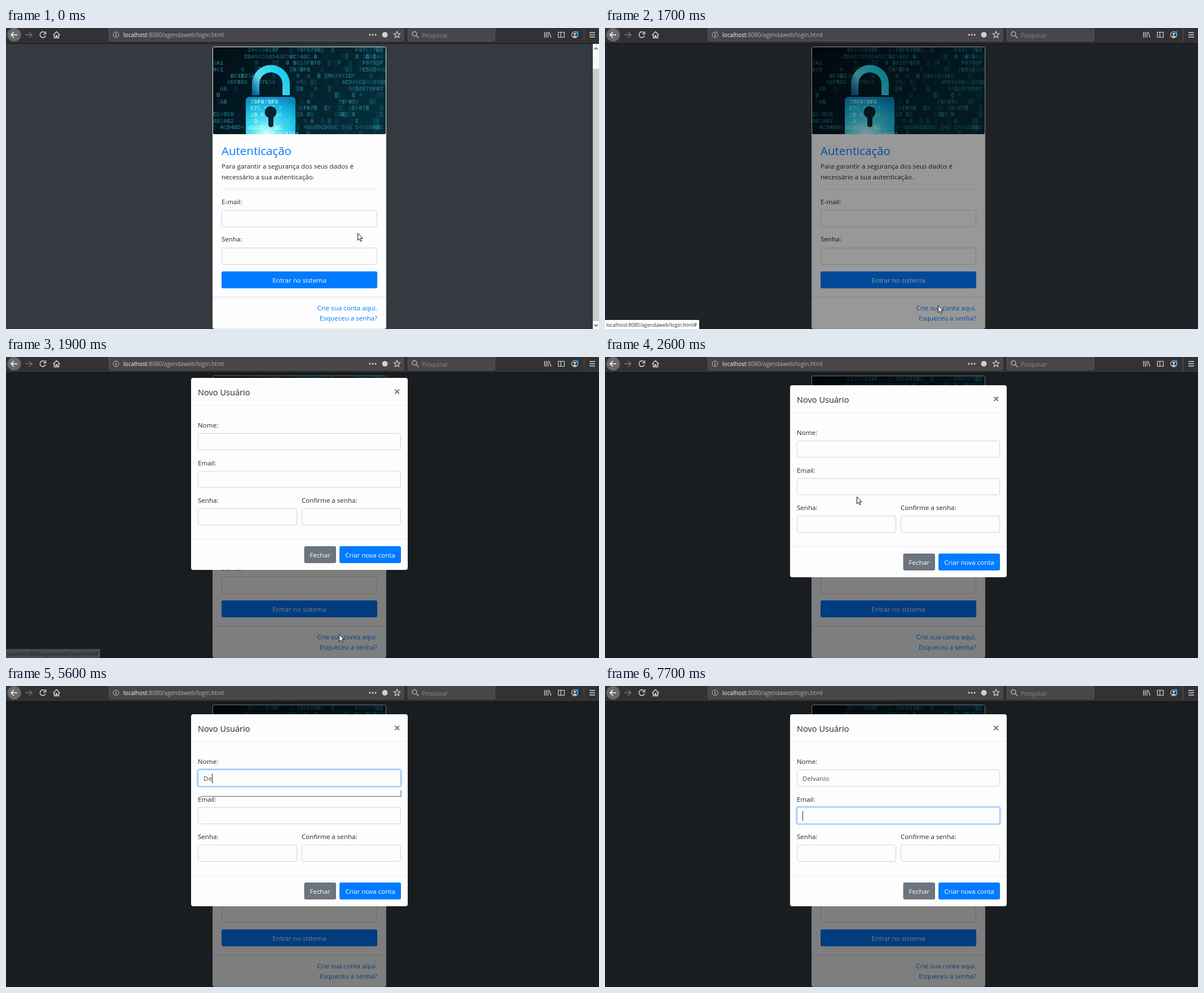
Recreate the animation shown at these times as an HTML page. Size 1051x533 px, loop 8000 ms.

```html
<!DOCTYPE html>
<html lang="pt">
<head>
<meta charset="utf-8">
<style>
html, body { margin: 0; width: 100%; height: 100%; overflow: hidden; background: #343a40; }
svg { display: block; font-family: "Open Sans", "Noto Sans", sans-serif; }
text { white-space: pre; }
.code { font: bold 10.3px "Liberation Mono", monospace; }
.icon { fill: none; stroke: #d8d8da; stroke-width: 1.5; }
</style>
</head>
<body>
<svg id="stage" width="1051" height="533" viewBox="0 0 1051 533"></svg>
<script>
const BLUE = "#007bff", INK = "#212529", BODY = 11.6;
const USER = "Delvanio";

const box = (x, y, w, h, fill, more = "") =>
  `<rect x="${x}" y="${y}" width="${w}" height="${h}" fill="${fill}" ${more}/>`;
const label = (x, y, str, size = BODY, fill = INK, more = "") =>
  `<text x="${x}" y="${y}" font-size="${size}" fill="${fill}" ${more}>${str}</text>`;
const rule = (x, y, w, color) => box(x, y, w, 1, color);
const icon = (d, more = "") => `<path class="icon" d="${d}" ${more}/>`;
const field = (x, y, w, id = "") =>
  (id && box(x - 1, y - 1, w + 2, 31.5, "none", `id="${id}Ring" rx="4" stroke="${BLUE}" stroke-opacity=".25" stroke-width="2.6"`)) +
  box(x + .5, y + .5, w - 1, 29, "#fdfdfd", `id="${id}Field" rx="3" stroke="#ced4da"`);
const button = (x, y, w, str, fill) =>
  box(x, y, w, 30, fill, 'rx="3"') + label(x + w / 2, y + 19.5, str, BODY, "#fff", 'text-anchor="middle"');

let seed = 7;
const random = () => (seed = seed * 16807 % 2147483647) / 2147483647;

// Rows of digits in a fixed grid, each with its own brightness
const digits = (x, y, rows, color, low, high) => rows.map((row, r) =>
  [...row].map((c, i) => c === " " ? "" :
    `<text class="code" x="${(x + i * 6.15).toFixed(1)}" y="${(y + r * 11.4).toFixed(1)}" fill="${color}" opacity="${(low + random() * (high - low)).toFixed(2)}">${c}</text>`
  ).join("")).join("");

// Faint glowing cells, denser to the right
const cells = Array.from({ length: 130 }, () => {
  const u = Math.sqrt(random());
  return box((367 + Math.floor(u * 50) * 6.15).toFixed(1), (34 + Math.floor(random() * 14) * 11.4).toFixed(1), 6.2, 10,
    "#15697c", `opacity="${(random() * .45).toFixed(2)}"`);
}).join("");

const codeRows = [
  "          29018018F     78F0780          F07EF7E8",
  "         CD45CD56D45C3BC34BC B           B 3AB34B",
  "9A1         9        0 9018F078     F      F078 F",
  "901     9              078F6              7E56D45C",
  "     BC4B23A            B  A  A  9A1891EF",
  "    6EF6DE  F67E56      05           4CD45CD4CD4BD",
  "  AB  2                  8   0         9018F78F07",
  " D                                      C 4",
  "  AB                       0        78F078",
  "                         EF67F  E7      EF67F",
  "CD45CD                   3 D       23B  B",
  "AB2AB2                    8 0            E",
  "  4CD4BD4                 4BD45CD4BC  4  D45CD4BC"
];
const lockRows = [" 78F078F0", " E7E 67E 7", " 2B B   34", "  3", "4C4BC   BC", "       A129A29A"];

const banner = `<g clip-path="url(#bannerClip)">
  ${box(367, 34, 306, 154, "url(#night)")}
  ${cells}
  ${digits(367, 42.3, codeRows, "#2b8ca5", .3, .85)}
  <path d="M442.500 119V99a27 27 0 0 1 54 0V119" fill="none" stroke="url(#steel)" stroke-width="13"/>
  ${box(425, 122, 88, 75, "url(#lock)", 'rx="6"')}
  ${digits(427, 134, lockRows, "#d6fdff", .3, .9)}
  <path d="M465 153h9v18a4.500 4.500 0 0 1-9 0z" fill="#032733"/>
  <circle cx="469" cy="149" r="10.500" fill="#032733"/></g>`;

const page = `${box(0, 28, 1051, 505, "#343a40")}
  ${box(366.5, 33.5, 307, 499, "#fdfdfd", 'rx="3" stroke="#e2e3e3"')}
  ${banner}
  ${label(382, 225, "Autenticação", 20.5, BLUE)}
  ${label(382, 249, "Para garantir a segurança dos seus dados é")}
  ${label(382, 268, "necessário a sua autenticação.")}
  ${rule(382, 285, 276, "#e3e3e3")}
  ${label(382, 312, "E-mail:")}${field(382, 322.5, 276)}
  ${label(382, 378, "Senha:")}${field(382, 389, 276)}
  ${button(382, 431, 276, "Entrar no sistema", BLUE)}
  ${rule(366, 476, 308, "#dcdcdc")}
  ${label(658, 500, "Crie sua conta aqui.", BODY, BLUE, 'id="signup" text-anchor="end"')}
  ${label(658, 518, "Esqueceu a senha?", BODY, BLUE, 'text-anchor="end"')}`;

const scrollbar = `<g id="scrollbar">${box(1040, 28, 11, 505, "#fafafa")}${box(1040, 72, 11, 447, "#cdcdcd")}
  <path d="M1043 38l3-3 3 3M1043 525l3 3 3-3" fill="none" stroke="#505050" stroke-width="1.500"/></g>`;

const status = `<g id="status">${box(0, 517, 167, 16, "#fff")}
  ${label(2, 529, "localhost:8080/agendaweb/login.html#", 8.85, "#333")}</g>`;

const modal = `<g id="modal">
  ${box(328, 50, 384, 340, "#fdfdfd", 'rx="4"')}
  ${label(340, 81, "Novo Usuário", 14.6)}
  <path d="M689.500 70.500l7.500 7.500m0-7.500l-7.500 7.500" stroke="#777" stroke-width="2"/>
  ${rule(328, 98, 384, "#e9ecef")}
  ${label(340, 138, "Nome:")}${field(340, 148, 360, "name")}
  ${label(350, 168, "", BODY, "#495057", 'id="typed"')}
  ${label(340, 205, "Email:")}${field(340, 214.5, 360, "mail")}
  ${label(340, 271, "Senha:")}${field(340, 281, 176)}
  ${label(524, 271, "Confirme a senha:")}${field(524, 281, 176)}
  ${rule(328, 335, 384, "#e9ecef")}
  ${button(528.5, 348, 56.5, "Fechar", "#6c757d")}
  ${button(591, 348, 109, "Criar nova conta", BLUE)}
  <path id="popup" d="M345 195.500H700V184" fill="none" stroke="#8c8c8c" stroke-width="1.500"/>
  ${box(350, 155, 1, 17, "#222", 'id="caret"')}</g>`;

const star = Array.from({ length: 10 }, (_, i) => {
  const a = i * Math.PI / 5, r = i % 2 ? 2.7 : 6;
  return `${(693 + r * Math.sin(a)).toFixed(1)} ${(12 - r * Math.cos(a)).toFixed(1)}`;
}).join("L");

const toolbar = `${box(0, 0, 1051, 28, "#323234")}${rule(0, 27, 1051, "#0f0f10")}
  ${box(182.5, -3, 522, 26, "#474749", 'rx="2" stroke="#59595b"')}
  ${box(712.5, -3, 154, 26, "#474749", 'rx="2" stroke="#59595b"')}
  <circle cx="14.500" cy="12" r="12" fill="#69696b"/>
  ${icon("M20 12H9M14 7l-5 5 5 5", 'style="stroke:#fff"')}
  ${icon("M34 12h11M41 7l5 5-5 5", 'opacity=".4"')}
  ${icon("M69 8.500a5 5 0 1 0 1 5M70.500 6v4.500H66")}
  ${icon("M83.500 12.500L89.500 6.500l6 6M85.500 12v5.500h3v-4h2v4h3V12")}
  <g opacity=".8"><circle class="icon" cx="195" cy="12" r="5" style="stroke-width:1"/>${icon("M195 11v4M195 8.500v1.200")}</g>
  ${label(208, 16, 'localhost<tspan fill="#b1b1b3">:8080/agendaweb/login.html</tspan>', 10.15, "#f9f9fa")}
  ${[645, 650, 655].map(x => `<circle cx="${x}" cy="12" r="1.500" fill="#d8d8da"/>`).join("")}
  <circle cx="671.500" cy="12" r="5" fill="#d0d0d2"/>
  ${icon(`M${star}Z`, 'style="stroke-width:1.2"')}
  <g opacity=".75"><circle class="icon" cx="724" cy="10.500" r="4"/>${icon("M727 13.500l4.500 4.500")}</g>
  ${label(737, 16.5, "Pesquisar", 10.15, "#88888a")}
  ${icon("M954.500 7v10M957.500 7v10M960.500 7v10M962.500 7l3.500 10", 'style="stroke-width:1.2"')}
  ${icon("M979 7.500h10.500v9H979zM983.500 7.500v9", 'style="stroke-width:1.2"')}
  <circle class="icon" cx="1008" cy="12" r="5.500" style="stroke-width:1.200"/>
  <circle cx="1008" cy="10.500" r="2" fill="#d8d8da"/><path d="M1004.500 15a4 3 0 0 1 7 0l-3.500 2z" fill="#d8d8da"/>
  <circle cx="1012" cy="8" r="2.500" fill="#0a9bff"/>
  ${box(1024, 0, 1, 24, "#555")}
  ${icon("M1034 8h10M1034 12h10M1034 16h10")}`;

document.getElementById("stage").innerHTML = `<defs>
  <clipPath id="bannerClip">${box(367, 34, 306, 154, "#000", 'rx="2"')}</clipPath>
  <linearGradient id="night" y2=".4"><stop stop-color="#020d14"/><stop offset=".5" stop-color="#031e28"/><stop offset="1" stop-color="#052c38"/></linearGradient>
  <linearGradient id="steel" x1="0" y1="1" x2="1" y2=".3"><stop stop-color="#0b62a0"/><stop offset=".4" stop-color="#5bdcf0"/><stop offset="1" stop-color="#16d0ec"/></linearGradient>
  <radialGradient id="lock" cx=".42" cy=".88" r=".95"><stop stop-color="#d8ffff"/><stop offset=".35" stop-color="#4fe0f2"/><stop offset=".7" stop-color="#17b9e0"/><stop offset="1" stop-color="#0b85bd"/></radialGradient></defs>
  ${page}${scrollbar}${box(0, 28, 1051, 505, "#000", 'id="backdrop"')}${status}${modal}${toolbar}
  <path id="cursor" d="M.5.500V13l2.800-2.700 2 4.500 2-.9-2-4.400h3.700z" fill="#fff" stroke="#111"/>`;

const $ = id => document.getElementById(id);
const show = (id, on) => $(id).style.display = on ? "" : "none";
const ramp = (t, start, length) => Math.min(1, Math.max(0, (t - start) / length));
const latest = (keys, t) => keys.filter(k => k[0] <= t).pop();

const pointer = [
  [0, 623, 363], [300, 609, 425], [400, 590, 485], [600, 590, 488], [700, 590, 491],
  [2300, 640, 430], [2400, 661, 365], [2600, 446, 247], [2700, 460, 217],
  [2800, 474, 188], [3000, 476, 188], [3300, 482, 179], [3400, 490, 170]
];
const typing = [[0, 0], [5300, 1], [5600, 2], [5800, 3], [6000, 4], [6200, 5], [6300, 7], [6400, 8]];

function focus(id, amount) {
  $(id + "Ring").style.opacity = amount;
  $(id + "Field").setAttribute("stroke", amount > .5 ? "#80bdff" : "#ced4da");
}

function draw(t) {
  const [, x, y] = latest(pointer, t);
  $("cursor").setAttribute("transform", `translate(${x} ${y})`);
  show("cursor", t < 3500);

  const hover = t >= 600 && t < 1700;
  $("signup").setAttribute("fill", hover ? "#0056b3" : BLUE);
  $("signup").setAttribute("text-decoration", hover ? "underline" : "none");
  $("status").style.opacity = ramp(t, 600, 300) - ramp(t, 1740, 200);

  show("scrollbar", t < 1700);
  $("backdrop").style.opacity = .5 * ramp(t, 1600, 125);
  $("modal").style.opacity = ramp(t, 1730, 150);
  const slide = -50 * (1 - ramp(t, 1730, 300)) ** 1.6;
  $("modal").setAttribute("transform", `translate(0 ${Math.round(slide)})`);

  const onMail = t >= 7600;
  focus("name", ramp(t, 4250, 150) - ramp(t, 7550, 150));
  focus("mail", ramp(t, 7550, 150));
  $("typed").textContent = USER.slice(0, latest(typing, t)[1]);
  show("popup", t >= 5600 && t < 5700);

  const blink = (t >= 5000 && t < 5300) || (t >= 7000 && t < 7400);
  show("caret", t >= 4300 && !blink);
  $("caret").setAttribute("x", onMail ? 350 : Math.round(350 + $("typed").getComputedTextLength()));
  $("caret").setAttribute("y", onMail ? 221.5 : 155);
}

function tick() {
  draw(Math.floor(performance.now() % 8000 / 100) * 100);
  requestAnimationFrame(tick);
}
tick();
</script>
</body>
</html>
```
